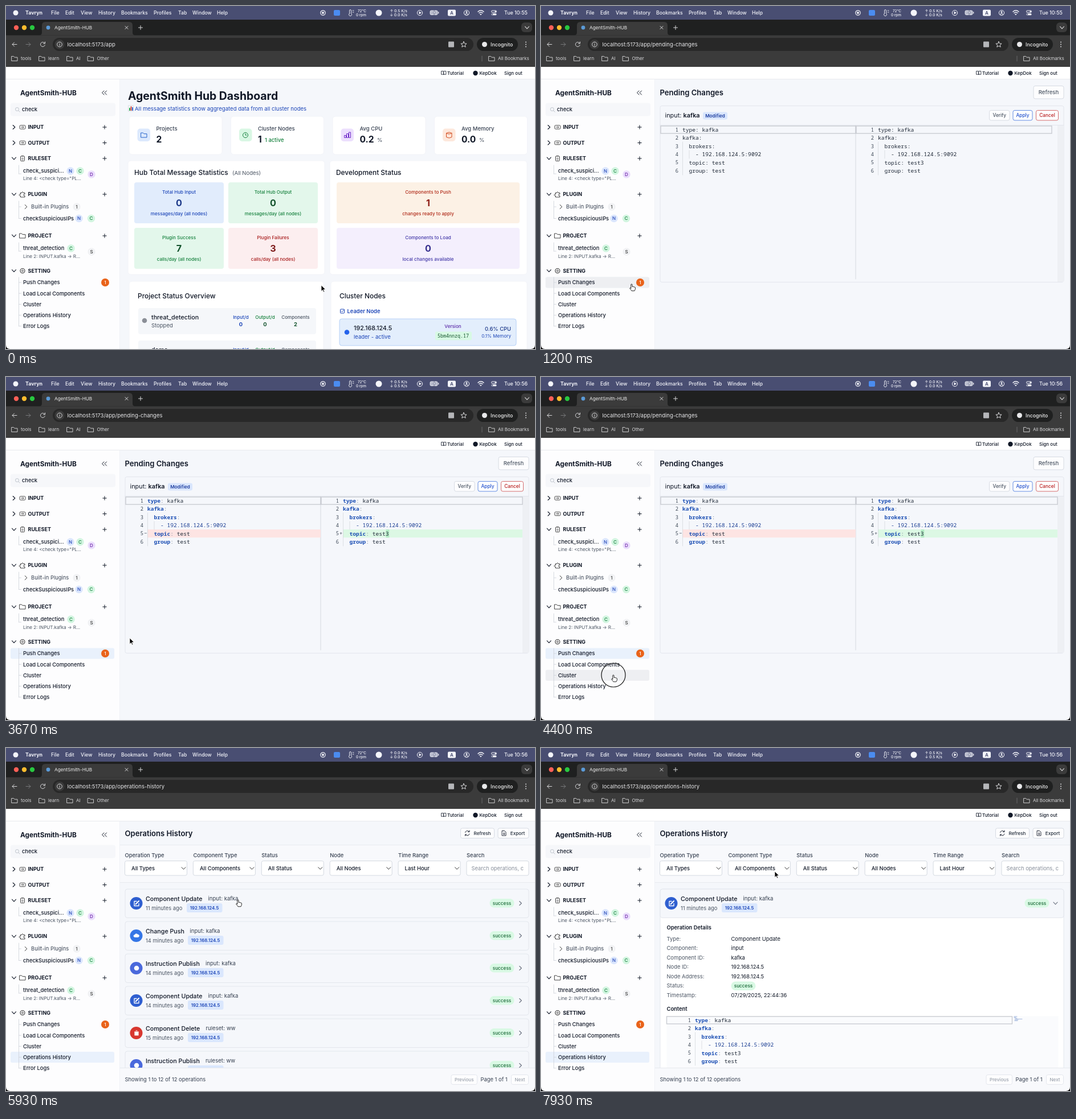
Animation, 928 px wide and 603 px high, one loop 8000 ms. Source, as an HTML page:

```html
<!DOCTYPE html>
<html lang="en">
<head>
<meta charset="utf-8">
<title>AgentSmith-HUB</title>
<style>
html, body { margin: 0; width: 100%; height: 100%; overflow: hidden; background: #000; }
svg { display: block; width: 100vw; height: 100vh; font-family: Inter, Roboto, sans-serif; font-optical-sizing: none; }
text { white-space: pre; }
.mono { font-family: "Noto Sans Mono", "DejaVu Sans Mono", monospace; }
</style>
</head>
<body>
<svg id="stage" viewBox="0 0 928 603"></svg>
<script>
const S = 8.1, M = 9.4, L = 10.7;
const INK = '#111827', GREY = '#4b5563', LINE = '#dfe3ea', BLUE = '#1d46b8', GREEN = '#15803d';

// Shape helpers; text is placed by the middle of its capitals.
const text = (x, y, s, size = M, fill = INK, weight = 400, anchor = 'start', extra = '') =>
  `<text x="${x}" y="${(y + size * .36).toFixed(2)}" font-size="${size}" fill="${fill}" font-weight="${weight}" text-anchor="${anchor}" ${extra}>${s}</text>`;
const mid = (x, y, s, size, fill, weight, extra) => text(x, y, s, size, fill, weight, 'middle', extra);
const mono = (x, y, s, size = 9.6, fill = '#1f2937', anchor = 'start', weight = 400) =>
  text(x, y, s, size, fill, weight, anchor, 'class="mono"');
const box = (x, y, w, h, fill, r = 0, stroke = 'none', sw = .8) =>
  `<rect x="${x}" y="${y}" width="${w}" height="${h}" rx="${r}" fill="${fill}" stroke="${stroke}" stroke-width="${sw}"/>`;
const dot = (x, y, r, fill, stroke = 'none', sw = 1) =>
  `<circle cx="${x}" cy="${y}" r="${r}" fill="${fill}" stroke="${stroke}" stroke-width="${sw}"/>`;
const path = (d, stroke = INK, w = 1, fill = 'none') =>
  `<path d="${d}" stroke="${stroke}" stroke-width="${w}" fill="${fill}" stroke-linecap="round" stroke-linejoin="round"/>`;
const layer = (id, body) => `<g id="${id}">${body}</g>`;
const folder = (x, y, c, w = 1) => path(`M${x - 5} ${y - 4}h3.5l1.5 1.7h5v6.3h-10z`, c, w);
const chevron = (x, y, open, c = INK, w = 1.1) =>
  path(open ? `M${x - 3.5} ${y - 1.8}l3.5 3.6 3.5-3.6` : `M${x - 1.8} ${y - 3.5}l3.6 3.5-3.6 3.5`, c, w);
const badge = (x, y, s, bg, fg) => dot(x, y, 6.7, bg) + mid(x, y, s, 8, fg, 500);
const button = (x, y, w, h, s, size, fg, border, cx = x + w / 2) =>
  box(x, y, w, h, '#fdfdfe', 3, border) + mid(cx, y + h / 2, s, size, fg, 500);

function browser() {
  const W = '#f4f5fa', D = '#d8d8da';
  const menu = [['File', 79], ['Edit', 104], ['View', 131], ['History', 162], ['Bookmarks', 202],
    ['Profiles', 259], ['Tab', 302], ['Window', 327], ['Help', 370]];
  const marks = [['tools', 10], ['learn', 58], ['AI', 107], ['Other', 143.5]];
  return box(0, 0, 928, 24, '#494e72') + dot(17, 12, 4.5, W) +
    text(34, 11.5, 'Tavryn', 8.8, W, 700) + menu.map(([s, x]) => text(x, 11.5, s, 8.7, W, 500)).join('') +
    dot(556, 12, 4.2, 'none', W, 1.2) + dot(556, 12, 2, W) + box(575, 7, 11, 10, '#4b8cf0', 2) +
    path('M602.5 13V8a1.5 1.5 0 0 1 3 0v5a2.5 2.5 0 1 1-3 0zM608 8h2M608 11h2', W, .9) +
    text(632, 8.5, '72°C', 6.4, W, 500, 'end') + text(632, 15.5, '0 rpm', 6.4, W, 500, 'end') +
    dot(654, 12, 5.5, W) + '<g id="net"></g>' +
    dot(726, 12, 4.6, 'none', W) + path('M724.8 9.8v4.4l3.6-2.2z', W, .5, W) +
    box(744, 8, 13, 7.5, '#b9bccd', 2, W) + path('M758.7 10.5v2.5', W, 1.2) + path('M751.5 7l-2.5 5h2.5l-1 4.5 3.5-6h-2.5z', '#494e72', .5, W) +
    box(775, 6.5, 14, 11, W, 2) + mid(782, 12, 'A', 8, '#494e72', 600) +
    dot(808, 12, 4.6, 'none', W) + dot(808, 10.6, 1.6, W) + path('M805.5 14.8q2.5-3 5 0', W, 1.2) +
    path('M828 10q5-4.5 10 0M830 12.3q3-2.7 6 0', W, 1.5) + path('M831.8 14.2h2.4l-1.2 1.5z', W, .8, W) +
    box(851.5, 8, 9, 3.3, 'none', 1.6, W, 1) + box(851.5, 13, 9, 3.3, W, 1.6) + dot(858.7, 9.7, 1.3, W) + dot(853.3, 14.7, 1.1, '#494e72') +
    '<g id="clock"></g>' +
    box(0, 24, 928, 83, '#3b3b3b') + box(0, 24, 928, 27.5, '#1f2020') +
    path('M58 51.5q5 0 5-5V34q0-6 6-6H216q6 0 6 6V46.5q0 5 5 5z', 'none', 0, '#3b3b3b') +
    dot(18, 38, 4.2, '#ff5f57') + dot(32, 38, 4.2, '#febc2e') + dot(46, 38, 4.2, '#28c840') +
    dot(74, 38, 3.4, '#5b9bd8') + text(85, 38, 'AgentSmith-HUB', 8.2, '#eee') +
    path('M209 35.5l5 5m0-5l-5 5', D) + path('M232.5 38h7M236 34.5v7', D) +
    box(904, 29, 19, 17, '#3b3b3b', 6) + chevron(914, 38, true, D) +
    path('M19 67.5h-8l3.5-3.5M11 67.5l3.5 3.5', D) + path('M35 67.5h8l-3.5-3.5M43 67.5l-3.5 3.5', '#77787a') +
    path('M68 65.5a4 4 0 1 0 .3 3.3M68.5 63v3h-3', D) +
    box(82, 56, 738, 23, '#282828', 11.5) + dot(94, 67.5, 8.5, '#3b3b3b') + dot(94, 67.5, 4.3, 'none', D) + path('M94 67v2.5M94 65.2v.1', D) +
    '<g id="url"></g>' + box(776, 62.5, 10, 10, '#b5b6b9', 1) +
    path('M803 62.5l1.5 3.4 3.6.3-2.8 2.4.9 3.6-3.2-2-3.2 2 .9-3.6-2.8-2.4 3.6-.3z', D) +
    box(826, 56, 72, 23, '#1f2020', 11.5) + dot(839.5, 67.5, 4.5, '#e8e8ea') + text(850, 67.5, 'Incognito', 8.8, '#eee', 500) +
    [63.5, 67.5, 71.5].map(y => dot(912, y, 1, D)).join('') +
    marks.map(([s, x]) => folder(x + 5, 92.5, D, .9) + text(x + 16, 92.5, s, S, D)).join('') +
    path('M835 88v9', '#68696b') + folder(852, 92.5, D, .9) + text(863, 92.5, 'All Bookmarks', S, D) +
    box(0, 107, 928, 496, '#fff') + path('M0 128.5H928', '#e2e5ea', .8) +
    path('M764 114.5h3q.7 0 .7 1v5.5q0-.7-1-.7H764zM771.400 114.5h-3q-.7 0-.7 1v5.500q0-.7 1-.7h2.700z', INK, .8) +
    text(774, 118, 'Tutorial', S, INK, 500) + dot(823.5, 118, 4.2, INK) +
    text(830.5, 118, 'KepDok', S, INK, 500) + text(874, 118, 'Sign out', S, INK, 500);
}

const ROWS = ['Push Changes', 'Load Local Components', 'Cluster', 'Operations History', 'Error Logs'];
const rowY = i => 486 + i * 19.2;

function sidebar() {
  const N = ['N', '#dbe6fd', '#2649b8'], C = ['C', '#d2f5e0', GREEN];
  const section = (y, name, open, icon, plus = true) => chevron(14, y, open) + icon + text(38.5, y, name, 9, INK, 700) +
    (plus ? path(`M169.800 ${y}h6.400M173 ${y - 3.2}v6.400`) : '');
  const port = y => box(24, y - 3.2, 10, 6.4, 'none', 1.5, '#333', .9) + path(`M26.500 ${y}h4.500M29.500 ${y - 1.5}l1.500 1.500-1.500 1.500`, '#333', .8);
  const tree = (y, ...ends) => path(`M22.500 ${y}V${ends.at(-1)}` + ends.map(e => `M22.500 ${e}h4`).join(''), '#cdd1d8', .8);
  return box(0, 129, 199, 474, '#fdfdfe') + text(25, 153, 'AgentSmith-HUB', 11.8, INK, 700) +
    path('M172 149l-3.500 3.500 3.500 3.500M176.500 149l-3.500 3.500 3.500 3.500') +
    box(8, 170.5, 184, 23, '#f6f7fa', 4) + dot(19.5, 181.5, 3, 'none', '#b5bbc5', .9) + path('M22 184l2.300 2.300', '#b5bbc5', .9) + text(28, 182, 'check', 9.3, INK, 500) +
    '<g id="rows"></g>' +
    section(213, 'INPUT', false, port(213)) + section(240.5, 'OUTPUT', false, port(240.5)) +
    section(268, 'RULESET', true, box(25.5, 264, 7, 8.5, 'none', 1, '#333', .9) + path('M27.500 263.500h3M27.500 267.500h3M27.500 270h3', '#333', .8)) +
    tree(280, 295) + text(30, 290, 'check_suspici...', 9.35, INK, 500) + badge(113, 290, ...N) + badge(130, 290, ...C) + badge(150, 296, 'D', '#eaddfc', '#6b21a8') +
    text(30, 303.5, 'Line 4: &lt;check type="PL...', S, GREY) +
    section(331, 'PLUGIN', true, path('M25.500 328.500h2a1.500 1.500 0 1 1 3 0h2.500v2.500a1.500 1.500 0 1 0 0 2.500v2.500h-7.500v-2.500a1.500 1.500 0 1 1 0-2.500z', '#333', .9)) +
    tree(343, 353, 373.5) + chevron(35, 353, false, '#333', 1) + text(44, 353, 'Built-in Plugins', M, '#374151') + badge(124, 353, 1, '#f1f2f4', '#444') +
    text(30, 373.5, 'checkSuspiciousIPs', 9.3, INK, 500) + badge(128, 373.5, ...N) + badge(149.5, 373.5, ...C) +
    section(404, 'PROJECT', true, folder(29, 404, '#333', .9)) + tree(416, 431) +
    text(30, 426, 'threat_detection', 9.3, INK, 500) + badge(114, 426, ...C) + badge(150, 432, 'S', '#f1f2f4', '#333') +
    text(30, 440, 'Line 2: INPUT.kafka -&gt; R...', S, GREY) +
    section(465.5, 'SETTING', true, dot(29, 465.5, 4, 'none', '#333', 1.1) + dot(29, 465.5, 1.5, 'none', '#333', .9), false) +
    tree(477, ...ROWS.map((_, i) => rowY(i))) + ROWS.map((s, i) => text(30, rowY(i), s, 9.35, INK, 500)).join('') +
    dot(174, 486, 7, '#e9631a') + mid(174, 486, 1, 8.2, '#fff', 500) + path('M199.500 129V603', '#edeff4', .8);
}

function dashboard() {
  const card = (x, y, w, h) => box(x, y, w, h, '#fff', 5, '#f0f2f6');
  const stat = (x, name, value, bg, icon, note = '', noteX = 0, noteColor = GREY) => card(x, 194, 163, 67) + box(x + 14.5, 215.5, 22.5, 22.5, bg, 5) + icon +
    text(x + 47.5, 216, name, 9.5, '#374151', 500) + text(x + 47.5, 234, value, 15.6, INK, 700) + text(noteX, 236, note, M, noteColor, 500);
  const tile = (x, y, w, bg, c, dark, name, value, note) => box(x, y, w, 72, bg, 4) + mid(x + w / 2, y + 17, name, S, c, 500) +
    mid(x + w / 2, y + 36.5, value, 16.2, dark, 700) + mid(x + w / 2, y + 55.5, note, S, c, 500);
  const project = (y, name, state, parts) => box(232, y, 312, 46, '#f5f7fa', 4) + dot(243, y + 22, 4.3, '#8b8f97') +
    text(255, y + 16, name, L, INK, 500) + text(255, y + 31, state, 9.5, GREY) +
    [['Input/d', 412, BLUE, 0], ['Output/d', 454.5, GREEN, 0], ['Components', 508, GREY, parts]]
      .map(([s, x, c, v], i) => mid(x, y + 16, s, S, c, 500) + mid(x, y + 28.5, v, M, i ? '#14532d' : BLUE, 700)).join('');
  const messages = 'messages/day (all nodes)', calls = 'calls/day (all nodes)';
  return text(214, 158.5, 'AgentSmith Hub Dashboard', 19.4, INK, 700) +
    box(214.5, 175, 9, 10, '#f3f4f6', 0, '#c7cbd2', .5) + box(216, 179, 2, 5, '#35a853') + box(218.5, 176.5, 2, 7.5, '#d9463e') + box(221, 178, 2, 6, '#3876db') +
    text(226, 180.5, 'All message statistics show aggregated data from all cluster nodes', 9.55, BLUE) +
    stat(216, 'Projects', 2, '#dce9fd', folder(242, 227, '#2563c9')) +
    stat(394.5, 'Cluster Nodes', 1, '#d9f7e4', dot(420, 227, 4.5, 'none', GREEN) + path('M420 224.500v2.500h2', GREEN), '1 active', 454, GREEN) +
    stat(573, 'Avg CPU', '0.2', '#ecdffd', path('M593.500 231v-3.500h3v3.500zM597.500 231v-6.500h3v6.500zM601.500 231v-9h3v9z', '#6d28c9'), '%', 651) +
    stat(751.5, 'Avg Memory', '0.0', '#fde8dc', path('M772.500 223.500v7q5 3 9.500 0v-7q-4.500-3-9.500 0q4.500 3 9.500 0', '#d24a1c'), '%', 830) +
    card(214, 272, 345, 200) + text(225, 293, 'Hub Total Message Statistics', 11.9, INK, 500) + text(397, 293.5, '(All Nodes)', 9.5, GREY) +
    tile(225, 310, 157, '#e1ecfc', BLUE, '#1e3a8a', 'Total Hub Input', 0, messages) + tile(390, 310, 157, '#e3f7eb', GREEN, '#14532d', 'Total Hub Output', 0, messages) +
    tile(225, 390, 157, '#e3f7eb', GREEN, '#14532d', 'Plugin Success', 7, calls) + tile(390, 390, 157, '#fceeef', '#a81d1d', '#7f1d1d', 'Plugin Failures', 3, calls) +
    card(568, 272, 346, 200) + text(579, 293, 'Development Status', 11.9, INK, 500) +
    tile(580, 310, 321, '#fcf1e5', '#b02a18', '#8f1d16', 'Components to Push', 1, 'changes ready to apply') +
    tile(580, 390, 321, '#f4effd', '#4338a8', '#37308f', 'Components to Load', 0, 'local changes available') +
    card(216, 484, 341, 130) + text(231, 510, 'Project Status Overview', 11.9, INK, 500) +
    project(531, 'threat_detection', 'Stopped', 2) + project(588, 'demo', 'Stopped', 3) +
    card(570, 484, 344, 130) + text(585, 510, 'Cluster Nodes', 11.9, INK, 500) +
    box(586.5, 533, 7, 7, 'none', 1, BLUE, 1) + path('M588 536.500l1.500 1.500 3-3.500', BLUE, .9) + text(598.5, 537, 'Leader Node', M, BLUE, 600) +
    box(585, 550, 310, 47, '#e3eefc', 4, '#a9c8f5') + dot(598, 573.5, 4.3, '#2563eb') + text(610, 566.5, '192.168.124.5', L, INK, 500) + text(610, 582, 'leader - active', 9.5, BLUE) +
    mid(784, 563.5, 'Version', S, '#5b2aa8', 500) + box(753, 572.5, 64, 15, '#d8f9e4', 2) + mono(784.5, 580, '5bm4nnzq.17', 8.3, '#14532d', 'middle') +
    text(886, 568, '0.6% CPU', M, '#1e3a8a', 500, 'end') + text(886, 580.5, '0.1% Memory', S, BLUE, 400, 'end');
}

const YAML = topic => ['type: kafka', 'kafka:', '  brokers:', '    - 192.168.124.5:9092', '  topic: ' + topic, '  group: test'];
function code(x, y, topic, coloured, mark = '') {
  const at = i => y + i * 14.45;
  const tint = s => s.replace(/^( *)(\w+)(:)/, '$1<tspan fill="#1c4fb4" font-weight="700">$2</tspan><tspan fill="#7c8490">$3</tspan>')
    .replace(/- [\d.:]+/, '<tspan fill="#1c3f94">$&</tspan>');
  return path(`M${x + .5} ${y + 21.5}V${y + 79.5}M${x + 12} ${y + 36.5}v14`, '#d5d8de', .8) +
    YAML(topic).map((s, i) => mono(x - 7, at(i), i + 1, 8.8, '#3f4a58', 'end') + mono(x, at(i), coloured ? tint(s) : s)).join('') +
    (mark && mono(x - 6, at(4), mark, 8.8, GREY));
}

function pending() {
  const diff = box(248, 268, 304, 14.3, '#fde4e3') + box(591, 268, 315, 14.3, '#dcf8e4') + box(666.5, 268, 5.8, 14.3, '#b3ebc4');
  const panes = coloured => code(248, 217.5, 'test', coloured, coloured ? '−' : '') + code(591, 217.5, 'test3', coloured, coloured ? '+' : '') +
    box(553, 211, coloured ? 353 : 343, 13, 'none', 0, '#c6c9cf', 1.3);
  return text(208.5, 152, 'Pending Changes', 13.1, INK, 600) + button(864, 140.5, 53, 22.5, 'Refresh', 9.6, GREY, '#cfd4dc') +
    box(209, 175.5, 708, 310, '#f5f7fb', 3, LINE) + text(217.5, 192.5, 'input: <tspan font-weight="600">kafka</tspan>', 10.9) +
    box(284, 186.5, 43, 13, '#d9e6fd', 3) + mid(305.5, 193, 'Modified', S, '#1e3fa0', 600) +
    button(786.5, 183.5, 35.5, 17.5, 'Verify', 8.3, GREY, '#cfd4dc') + button(828, 183.5, 34, 17.5, 'Apply', 8.3, '#2554cf', '#3f73dd') + button(868.5, 183.5, 39, 17.5, 'Cancel', 8.3, '#b91c1c', '#cc4a4a') +
    path('M209 209.500H917', LINE, .8) + box(906, 210, 11, 275, '#eef0f4') + path('M552 210V480', '#d3d6dc', .9) +
    box(210, 211, 342, 13, 'none', 0, '#c6c9cf', 1.3) + layer('plain', panes(false)) + layer('diff', diff + panes(true));
}

function cluster() {
  const meter = x => box(x, 223.5, 33, 5, '#dfe2e7', 2) + box(x, 223.5, 1.5, 5, '#4cb56f', .7);
  const col = (x, s, c = '#374151') => mid(x, 210.5, s, S, c, 500);
  return text(214, 160.5, 'Cluster Nodes', 15.6, INK, 700) +
    box(811, 146, 150, 28, '#fff', 4, '#d0d5dd') + dot(824.5, 159, 4, 'none', '#8c939e') + path('M827.500 162l3 3', '#8c939e') + text(838, 160, 'Search by IP address', L, '#7e8591') +
    box(213.5, 190.5, 760, 58, '#fdfdfe', 5, '#3d78d6', 1.6) + box(232, 209.5, 54, 19, '#d9e6fd', 9.5) + text(239, 219, '• Leader', 9.5, BLUE, 500) +
    text(297, 212.5, '192.168.124.5', 11.7, INK, 600) + text(297, 229, 'ID: 192.168.124.5', 9.2, GREY) + dot(411, 219, 4.3, '#2fb344') +
    mid(481, 208, 'Input/d', S, BLUE, 500) + mid(481, 226, 0, 12.9, '#1e3a8a', 700) + mid(536, 208, 'Output/d', S, GREEN, 500) + mid(536, 226, 0, 12.9, '#14532d', 700) +
    col(613, 'Version', '#5b2aa8') + box(569, 219, 88.5, 14.5, '#d8f9e4', 2) + mono(613, 226, '5bm4nnzq.17', 7, '#14532d', 'middle') +
    col(705, 'CPU') + meter(673) + text(736, 226, '0.6%', M, GREEN, 700, 'end') +
    col(789, 'Memory') + meter(753) + text(825, 226, '13.7MB', M, GREEN, 700, 'end') +
    mid(863, 208, 'Goroutines', S, '#374151', 500) + mid(863, 226, 57, 12.9, INK, 700) + text(910, 209.5, 'Last Seen', S, '#374151', 500) + text(915, 227, 'Just now', 7, GREY);
}

function history() {
  const filters = [['Operation Type', 'All Types'], ['Component Type', 'All Components'], ['Status', 'All Status'], ['Node', 'All Nodes'], ['Time Range', 'Last Hour'], ['Search', '']];
  const filter = ([name, value], i) => {
    const x = 208.5 + i * 119.9;
    return text(x, 189, name, M, '#374151', 500) + box(x, 198.5, 109, 25.5, '#fff', 3, '#cbd1da') +
      (value ? text(x + 11.5, 211.5, value, M, INK, 500) + chevron(x + 103, 211.5, true, '#333', 1) : text(x + 8.5, 211.5, 'Search operations, c', M, '#878e9a'));
  };
  const edit = ['#2f5fd0', y => path(`M229 ${y - 3.5}h-4v8h8v-4`, '#fff', 1.3) + path(`M227.500 ${y + 1.5}l5.500-5.500`, '#fff', 2)];
  const push = ['#3576e6', y => path(`M226 ${y + 2.5}a2 2 0 0 1 0-4a2.800 2.800 0 0 1 5-.5a2 2 0 0 1 .5 4.500z`, '#fff', .8, '#fff')];
  const publish = ['#4a69dc', y => dot(229, y, 4.3, '#fff')];
  const remove = ['#d8372f', y => path(`M225.500 ${y - 2}h7M228 ${y - 4}h2M226 ${y - 1}h6v5h-6z`, '#fff', 1.2, '#fff')];
  const items = [['Component Update', 354.5, 'input: kafka', 11, edit], ['Change Push', 322.5, 'input: kafka', 14, push], ['Instruction Publish', 350, 'input: kafka', 14, publish],
    ['Component Update', 354.5, 'input: kafka', 14, edit], ['Component Delete', 350.500, 'ruleset: ww', 15, remove], ['Instruction Publish', 350, 'ruleset: ww', 15, publish]];
  const success = (x, y) => box(x - 21.5, y - 8, 43, 15.5, '#d9f9e4', 7.7) + mid(x, y, 'success', 8.2, '#166534', 500);
  const item = ([name, subX, sub, age, [color, icon]], i, open) => {
    const y = 248 + i * 57, chipX = age === 11 ? 317 : 319;
    return box(209, y, 708, 50.5, '#f5f7fb', 4, LINE) + dot(228.5, y + 25, 11, color) + icon(y + 25) +
      text(245, y + 17, name, L, INK, 500) + text(subX, y + 17, sub, 9.6, '#374151') + text(245, y + 33.5, age + ' minutes ago', M, GREY) +
      box(chipX, y + 25, 62.5, 16, '#dae7fd', 3) + mid(chipX + 31, y + 33.5, '192.168.124.5', 7.9, BLUE, 600) +
      success(870, y + 25) + chevron(902.5, y + 25, open, '#6b7280');
  };
  const details = [['Type:', 'Component Update'], ['Component:', 'input'], ['Component ID:', 'kafka'], ['Node ID:', '192.168.124.5'], ['Node Address:', '192.168.124.5'], ['Status:', ''], ['Timestamp:', '07/29/2025, 22:44:36']];
  const expanded = box(209, 248, 708, 380, '#fff', 4, LINE) + item(items[0], 0, true) + text(220.5, 316, 'Operation Details', M, INK, 600) +
    details.map(([k, v], i) => text(220.5, 335.5 + i * 16.5, k, M, GREY) + text(333.5, 335.5 + i * 16.5, v, M)).join('') + success(355, 418.5) +
    text(220.5, 459, 'Content', M, INK, 600) + box(220.5, 471.5, 687, 110, '#fafbfd') + box(220.5, 472, 606, 13, 'none', 0, '#c6c9cf', 1.3) +
    code(270, 478.5, 'test3', true) + path('M830 472h5M830 473.500h3M831 475h4M832 476.500h12M831 478h6M831 479.500h5', '#7f9bd0', .7);
  return box(200, 170, 728, 66, '#f8f9fc') + path('M200 170.500H928M200 236.500H928', '#e4e7ed', .8) + text(208.5, 150, 'Operations History', 13.1, INK, 600) +
    button(797.5, 141, 59, 17.5, 'Refresh', S, '#1f2937', '#cfd4dc', 835.5) + path('M805.500 148.500a4 4 0 0 1 7-1.500M813 145v2.500h-2.500M813 151a4 4 0 0 1-7 1.500M805.500 154.500v-2.500h2.500', INK, .9) +
    button(863, 141, 54, 17.5, 'Export', S, '#1f2937', '#cfd4dc', 897.5) + path('M870.500 145.500h4l2.500 2.500v6h-6.500zM873.700 148.500v3.500M872.200 150.700l1.500 1.500 1.500-1.500', INK, .9) +
    filters.map(filter).join('') + '<clipPath id="listClip"><rect x="200" y="237" width="728" height="325"/></clipPath><g clip-path="url(#listClip)">' +
    layer('list', items.map((it, i) => item(it, i, false)).join('')) + layer('expanded', expanded) + '</g>' +
    box(200, 562, 728, 41, '#f8f9fc') + path('M200 562.500H928', '#e2e5eb', .8) + text(208.5, 583, 'Showing 1 to 12 of 12 operations', M, '#374151') +
    button(781, 574.5, 45.5, 17, 'Previous', S, '#9aa1ac', LINE) + text(832.5, 583, 'Page 1 of 1', M, '#374151') + button(886.5, 574.5, 30, 17, 'Next', S, '#9aa1ac', LINE);
}

const stage = document.getElementById('stage');
stage.innerHTML = browser() + box(200, 129, 728, 474, '#f5f7fb') +
  layer('dashboard', dashboard()) + layer('pending', pending()) + layer('cluster', cluster()) + layer('history', history()) + sidebar() +
  path('M0 603v-7q0 7 7 7zM928 603v-7q0 7-7 7z', 'none', 0, '#000') +
  layer('pointer', layer('ring', dot(0, 0, 21, 'none', '#111', 1.2)) +
    layer('arrow', path('M0 0v10.500l2.500-2.300 1.700 3.800 1.600-.7-1.700-3.700h3.400z', '#fff', .8, '#000')) +
    layer('beam', path('M-2.500-5.500q2.500 0 2.500 1.500v8q0 1.500-2.500 1.500M2.500-5.500q-2.500 0-2.500 1.500v8q0 1.500 2.500 1.500', '#222', 1)) +
    layer('hand', path('M-1.200 7V1a1.100 1.100 0 0 1 2.200 0v3.500q1.500-.8 2 .3q1.500-.5 2 .5q1.500-.2 1.500 1.500q0 3-1.500 5h-5q-1.500-2.500-3.500-4.500q0-1.500 2.300-.3z', '#111', .9, '#fff')));
const el = Object.fromEntries([...stage.querySelectorAll('g[id]')].map(g => [g.id, g]));
const show = (id, on) => el[id].setAttribute('display', on ? 'inline' : 'none');

const LOOP = 8000;
const PAGES = [[0, 'dashboard', '', -1], [1000, 'pending', '/pending-changes', 0], [4430, 'cluster', '/cluster', 2], [5400, 'history', '/operations-history', 3]];
const SPEEDS = [[0, '0.5', '0.0'], [1800, '0.5', '0.5'], [4400, '0.0', '0.0'], [6400, '0.5', '0.5']];
const MOVES = [[0, 553, 491], [200, 553, 491], [800, 159, 489], [1450, 159, 489], [2200, 647, 317], [2950, 647, 317], [3600, 217, 459], [3700, 217, 459],
  [4200, 127, 524], [4850, 127, 524], [5150, 127, 541], [5400, 127, 541], [5880, 407, 267], [6600, 407, 267], [7200, 410, 217], [LOOP, 410, 217]];
const CLICKS = [870, 4300, 5250, 6200];
const latest = (list, t) => list.findLast(([start]) => start <= t);

function pointerAt(t) {
  const i = MOVES.findIndex(([end]) => end > t);
  const [t0, x0, y0] = MOVES[i - 1], [t1, x1, y1] = MOVES[i];
  const u = (t - t0) / (t1 - t0), e = u * u * (3 - 2 * u);
  return [x0 + (x1 - x0) * e, y0 + (y1 - y0) * e];
}

function draw(now) {
  const t = now % LOOP, [x, y] = pointerAt(t);
  const [, page, url, selected] = latest(PAGES, t), [, up, down] = latest(SPEEDS, t);
  for (const [, id] of PAGES) show(id, id === page);
  show('plain', t < 1400);
  show('diff', t >= 1400);
  show('list', t < 6330);
  show('expanded', t >= 6330);
  el.url.innerHTML = text(107.5, 67.5, 'localhost:5173/app' + url, 9.5, '#e6e6e8');
  el.clock.innerHTML = text(874, 11.5, t < 1700 ? 'Tue 10:55' : 'Tue 10:56', 8.9, '#f4f5fa', 500);
  el.net.innerHTML = text(704, 8.5, `↑ ${up} K/s`, 6.8, '#f4f5fa', 500, 'end') + text(704, 15.5, `↓ ${down} K/s`, 6.8, '#f4f5fa', 500, 'end');

  const hover = x > 8 && x < 190 ? ROWS.findIndex((_, i) => Math.abs(y - rowY(i)) < 9.6) : -1;
  const rowBox = (i, fill) => i < 0 ? '' : box(8, rowY(i) - 9.6, 182, 19.2, fill, 3);
  el.rows.innerHTML = rowBox(selected, '#e9f1fc') + rowBox(hover, '#eeeff2');

  const hand = hover >= 0 || page === 'history' && x > 209 && y > 248 && y < 298;
  const beam = page === 'pending' && x > 248 && y > 210 && y < 486;
  show('hand', hand);
  show('beam', beam && !hand);
  show('arrow', !hand && !beam);
  show('ring', CLICKS.some(c => t >= c - 50 && t < c + 150));
  el.pointer.setAttribute('transform', `translate(${x.toFixed(1)} ${y.toFixed(1)})`);
}

const start = performance.now();
(function tick() {
  draw(performance.now() - start);
  requestAnimationFrame(tick);
})();
</script>
</body>
</html>
```
